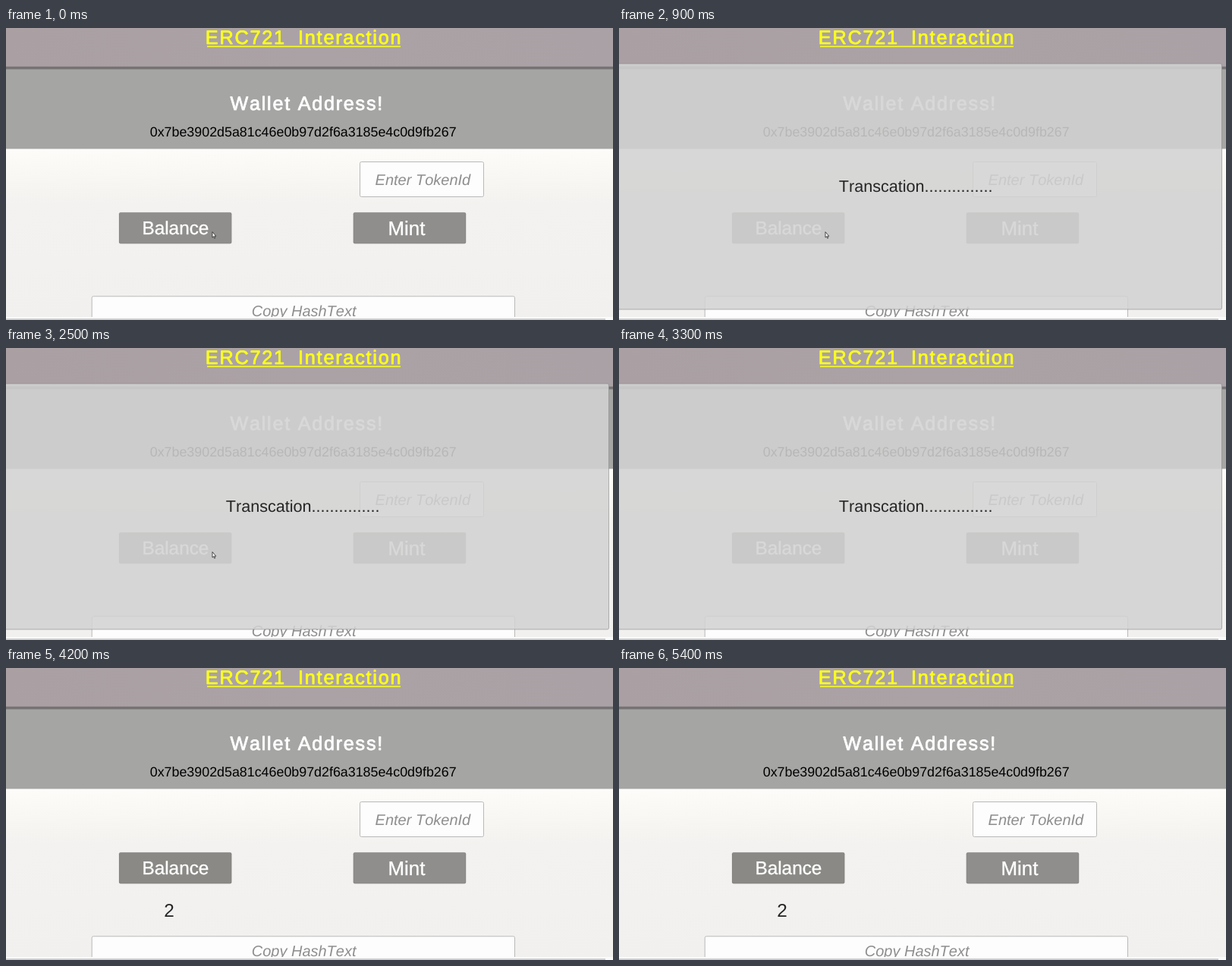
Animation of 800x385 px, one loop 5500 ms. Source, as an HTML page:

```html
<!DOCTYPE html>
<html lang="en">
<head>
<meta charset="utf-8">
<title>ERC721 Interaction</title>
<style>
  html, body { margin: 0; width: 100%; height: 100%; overflow: hidden; background: #f1f0ef; }
  svg { display: block; width: 100vw; height: 100vh; }
  text { font-family: "Liberation Sans", Arial, sans-serif; font-kerning: none; white-space: pre; text-rendering: geometricPrecision; }
  .bold { letter-spacing: .07em; stroke-width: .8; stroke-linejoin: round; }
  .yellow { fill: #fbff1c; stroke: #fbff1c; font-size: 25.25px; }
  .white { fill: #fff; stroke: #fff; font-size: 25.15px; }
  .label { fill: #fff; stroke: #fff; stroke-width: .35; }
  .hint { fill: #8e8e8e; font-size: 20px; font-style: italic; }
  .field { fill: #fdfdfd; stroke: #b9b9b8; }
  .button { fill: #8f8e8c; stroke: #000; stroke-opacity: .1; }
</style>
</head>
<body>
<svg viewBox="0 0 800 385" preserveAspectRatio="none">
  <defs>
    <linearGradient id="page" x2="0" y2="1">
      <stop offset="0" stop-color="#fdfcfa"/>
      <stop offset=".1" stop-color="#faf9f5"/>
      <stop offset=".32" stop-color="#f3f2f0"/>
      <stop offset="1" stop-color="#f1f0ef"/>
    </linearGradient>
    <linearGradient id="head" x2="1" y2="0">
      <stop offset="0" stop-color="#aaa0a3"/>
      <stop offset=".5" stop-color="#aba2a5"/>
      <stop offset="1" stop-color="#aaa1a6"/>
    </linearGradient>
    <clipPath id="view"><rect width="800" height="381"/></clipPath>
  </defs>

  <rect y="159" width="800" height="226" fill="url(#page)"/>
  <rect width="800" height="51" fill="url(#head)"/>
  <rect y="54" width="800" height="105.4" fill="#a5a5a4"/>
  <rect y="50.8" width="800" height="3.6" fill="#757374"/>

  <text class="bold white" x="295.5" y="108.3">Wallet Address!</text>
  <text x="391.7" y="142.8" font-size="17.85" text-anchor="middle">0x7be3902d5a81c46e0b97d2f6a3185e4c0d9fb267</text>

  <rect class="field" x="466.5" y="176.5" width="163" height="46" rx="2"/>
  <text class="hint" x="486.6" y="207">Enter TokenId</text>

  <rect class="button" id="balance" x="149" y="243.3" width="148.3" height="41" rx="2"/>
  <text class="label" x="179.5" y="272.3" font-size="24.3">Balance</text>
  <rect class="button" x="457.8" y="243.3" width="148.3" height="41" rx="2"/>
  <text class="label" x="503.5" y="272.6" font-size="25.9">Mint</text>
  <text id="count" x="215" y="327.7" font-size="24.3" fill="#262626" text-anchor="middle">2</text>

  <g clip-path="url(#view)">
    <rect class="field" x="113.2" y="353.8" width="557.3" height="46" rx="2"/>
    <text class="hint" x="323.7" y="379.5">Copy HashText</text>
  </g>
  <rect y="381" width="800" height="4" fill="#fafafa"/>
  <rect y="383.5" width="790" height="1" fill="#a3a3a3"/>

  <g id="modal">
    <rect x="-2" y="47" width="796.5" height="324" rx="2" fill="#d3d3d3" fill-opacity=".87" stroke="#888" stroke-opacity=".6"/>
    <text x="289.8" y="216.3" font-size="21.6" fill="#262626">Transcation...............</text>
  </g>

  <text class="bold yellow" x="262.8" y="20.9">ERC721</text>
  <text class="bold yellow" x="385" y="20.9">Interaction</text>
  <rect x="265" y="23.6" width="255" height="1.6" fill="#fbff1c"/>

  <path id="cursor" d="M272 268.8v7.4l1.6-1.4 1.1 2.5 1.1-.5-1.1-2.4h2z" fill="#fff" stroke="#222" stroke-width=".8"/>
</svg>
<script>
const LOOP = 5500, PRESS = 500, OPEN = 900, LEAVE = 2800, CLOSE = 4200;
const el = id => document.getElementById(id);
const [balance, count, modal, cursor] = ["balance", "count", "modal", "cursor"].map(el);
const show = (node, on) => node.setAttribute("visibility", on ? "visible" : "hidden");
const mix = (a, b, k) => Math.round(a + (b - a) * k);

function buttonTone(t) {
  if (t >= CLOSE) return [138, 137, 133];
  if (t >= OPEN) return [143, 142, 140];
  const k = Math.min(1, Math.max(0, (t - PRESS) / 100));
  return [mix(143, 112, k), mix(142, 111, k), mix(140, 110, k)];
}

function draw(t) {
  balance.style.fill = `rgb(${buttonTone(t)})`;
  show(modal, t >= OPEN && t < CLOSE);
  show(cursor, t < LEAVE);
  show(count, t >= CLOSE);
}

const start = performance.now();
function tick() {
  draw((performance.now() - start) % LOOP);
  requestAnimationFrame(tick);
}
tick();
</script>
</body>
</html>
```
